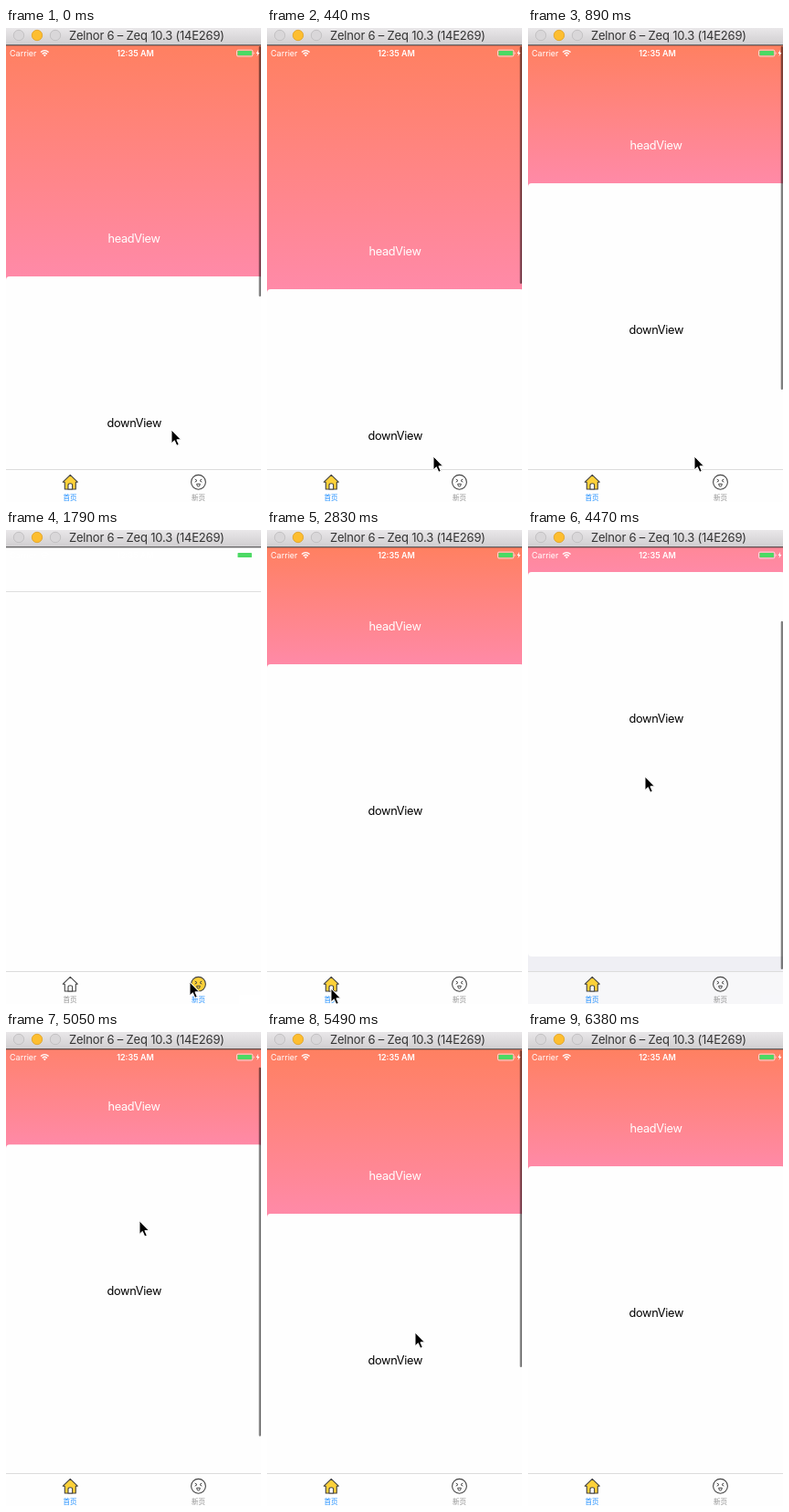
Animation of 279x519 px, one loop 6.68 s. Source, as an HTML page:

```html
<!DOCTYPE html>
<html lang="en">
<head>
<meta charset="utf-8">
<title>Stretching header</title>
<style>
html, body { margin: 0; width: 100%; height: 100%; overflow: hidden; background: #fefefe; }
svg { display: block; }
text { font-family: Inter, Roboto, sans-serif; }
.label { font-size: 12.75px; letter-spacing: -.3px; text-anchor: middle; }
.status { font-size: 9px; fill: #fff; }
.tab { --fill: none; --ink: #929292; }
.tab.on { --fill: #fdd13a; --ink: #1b8cff; }
.tab text { font: 7.5px "Noto Sans CJK SC", "Noto Sans CJK", sans-serif; text-anchor: middle; fill: var(--ink); }
.icon { fill: var(--fill); stroke: #444; stroke-width: 1.1; stroke-linejoin: round; }
</style>
</head>
<body>
<svg width="279" height="519" viewBox="0 0 279 519">
  <defs>
    <linearGradient id="sunset" x2="0" y2="1">
      <stop stop-color="#ff8061"/><stop offset="1" stop-color="#ff8aa9"/>
    </linearGradient>
    <linearGradient id="chrome" x2="0" y2="1">
      <stop stop-color="#e9e7e9"/><stop offset="1" stop-color="#d0ced0"/>
    </linearGradient>
  </defs>

  <g id="home">
    <rect y="19" width="281" height="500" fill="#efeff4"/>
    <rect id="head" width="281" fill="url(#sunset)"/>
    <g id="content">
      <text class="label" x="140" y="110" fill="#fff">headView</text>
      <rect y="147" width="281" height="421" rx="4" fill="#fefefe"/>
      <text class="label" x="140.3" y="312">downView</text>
    </g>
    <rect id="thumb" x="276.7" width="2.3" rx="1.1" fill="#000" fill-opacity=".5"/>
  </g>
  <path id="navLine" d="M0 67.5H279" stroke="#dedede"/>

  <g class="status">
    <text x="4" y="31">Carrier</text>
    <text x="141.5" y="31" text-anchor="middle" font-weight="600">12:35 AM</text>
    <g fill="none" stroke="#fff" stroke-width="1.3">
      <path d="M38 26.6Q42.3 22.6 46.6 26.6M39.7 28.5Q42.3 26.1 44.9 28.5"/>
      <rect x="252.5" y="24.1" width="17.4" height="6.9" rx="1.5" stroke-width=".7"/>
    </g>
    <path d="M40.8 29.8Q42.3 28.4 43.8 29.8L42.3 31.3ZM270.8 26.2Q272.2 27.5 270.8 28.9ZM276 24L273.6 28H275.2L274.6 31L277.4 26.9H275.7Z"/>
    <rect x="253.5" y="25" width="15.4" height="5.1" rx=".7" fill="#4cd964"/>
  </g>

  <rect y="483" width="279" height="36" fill="#fff" fill-opacity=".5"/>
  <path d="M0 483.5H279" stroke="#dcdcdc"/>
  <g class="tab" id="homeTab">
    <path class="icon" d="M70.3 489.3L78.3 497.2H76.3V505H64.3V497.2H62.3Z"/>
    <path class="icon" style="fill:#fff" d="M68 505V500.5Q68 498.7 70.3 498.7T72.6 500.5V505Z"/>
    <text x="70" y="517.3">首页</text>
  </g>
  <g class="tab" id="newTab">
    <circle class="icon" cx="210.5" cy="497.3" r="7.9"/>
    <path d="M206.7 494L209 495.6L206.7 497.2M214.3 494L212 495.6L214.3 497.2M208.7 499.2H212.3Q212.2 502 210.5 502T208.7 499.2Z" fill="none" stroke="#444"/>
    <text x="210.5" y="517.3">新页</text>
  </g>

  <rect width="279" height="18.5" fill="url(#chrome)"/>
  <path d="M0 18.8H279" stroke="#333"/>
  <g fill="#d9d7d9" stroke="#bdbbbd" stroke-width=".8">
    <circle cx="14" cy="8" r="5.7"/>
    <circle cx="34" cy="8" r="5.7" fill="#fdbe30" stroke="#dfa023"/>
    <circle cx="54" cy="8" r="5.7"/>
  </g>
  <text x="69" y="12.8" font-size="13" letter-spacing="-.2" fill="#333">Zelnor 6 – Zeq 10.3 (14E269)</text>

  <path id="cursor" d="M0 0V14.8L3.3 11.7L5.8 17.3L8.3 16.2L5.9 10.8H10.5Z" stroke="#fff"/>
</svg>

<script>
const LOOP = 6680, TICKS = 45;
const TOP = 19, HEAD_BOTTOM = 147, MAX_SCROLL = 85;

// tick, pointer x, pointer y, content shift (positive = pulled down)
const KEYS = [
  [0, 181, 440, 125], [3, 182, 469, 139], [4, 182, 469, 139],
  [5, 182, 469, 90], [6, 182, 469, 23], [7, 184, 473, 5], [8, 189, 481, 0],
  [10, 201, 495, 0], [14, 201, 495, 0], [17, 70, 502, 0], [21, 70, 502, 0],
  [22, 95, 455, 0], [24, 127, 385, 0], [26, 128, 315, -70],
  [28, 128, 270, -105], [29, 128, 270, -105], [30, 128, 270, -101],
  [31, 130, 205, -88], [32, 134, 140, -85], [35, 152, 240, 7],
  [37, 162, 329, 52], [39, 176, 440, 115], [40, 181, 476, 133],
  [41, 181, 476, 60], [42, 181, 476, 8], [43, 181, 476, 0], [45, 181, 476, 0]
];

const el = id => document.getElementById(id);
const set = (id, attrs) => {
  for (const name in attrs) el(id).setAttribute(name, attrs[name]);
};
const show = (id, visible) => { el(id).style.display = visible ? '' : 'none'; };
const within = (tick, from, to) => tick >= from && tick < to;

function pose(tick) {
  const i = KEYS.findIndex(key => key[0] > tick);
  const a = KEYS[i - 1], b = KEYS[i];
  const p = (tick - a[0]) / (b[0] - a[0]);
  return a.slice(1).map((v, n) => v + (b[n + 1] - v) * p);
}

function draw(tick) {
  const [x, y, shift] = pose(tick);
  const onNewPage = within(tick, 12, 19);
  show('home', !onNewPage);
  show('navLine', onNewPage);
  el('homeTab').classList.toggle('on', !onNewPage);
  el('newTab').classList.toggle('on', onNewPage);

  const headTop = TOP + Math.min(0, shift);
  set('head', { y: headTop, height: HEAD_BOTTOM + shift - headTop + 4 });
  set('content', { transform: `translate(0 ${shift})` });

  // The scroll thumb shrinks while either end is overscrolled.
  const thumbTop = 20 + Math.max(0, -shift) * .79;
  const thumbBottom = Math.min(481, 419 - shift);
  set('thumb', { y: thumbTop, height: thumbBottom - thumbTop });
  show('thumb', tick < 9 || within(tick, 25, 43));

  set('cursor', { transform: `translate(${x} ${y})` });
  show('cursor', tick < 43);
}

function frame() {
  const t = performance.now() % LOOP;
  draw(Math.min(TICKS - 1, Math.floor((t + 8) * TICKS / LOOP)));
  requestAnimationFrame(frame);
}
frame();
</script>
</body>
</html>
```
